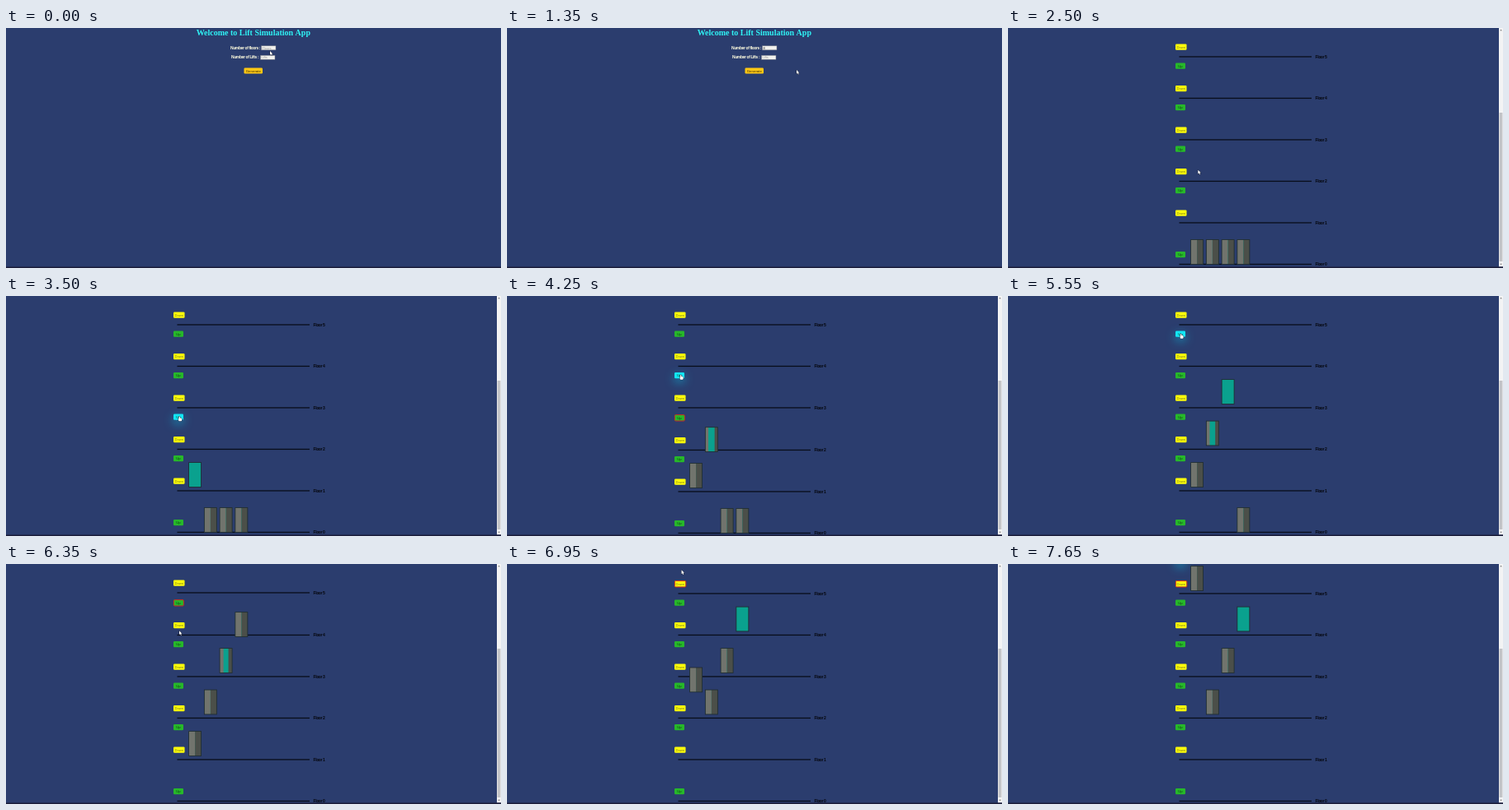
An HTML page with a canvas for the animation above (7.7 s loop, 600 by 292 pixels).

```html
<!DOCTYPE html>
<html lang="en">
<head>
<meta charset="utf-8">
<title>Lift Simulation</title>
<style>
html, body { margin: 0; width: 100%; height: 100%; overflow: hidden; background: #2b3d6e; }
canvas { display: block; width: 600px; height: 292px; }
</style>
</head>
<body>
<canvas id="stage" width="600" height="292"></canvas>
<script>
const ctx = document.getElementById('stage').getContext('2d');
const LOOP = 7700, SCROLL = 157, FLOORS = 8, GAP = 50.5, GROUND = 287.4;
const SANS = '"Liberation Sans", Arial, sans-serif';
const SERIF = '"Liberation Serif", "Times New Roman", serif';
const TYPED_FLOORS = 600, TYPED_LIFTS = 1700, GENERATED = 1900;

// time, x, y of the pointer tip
const path = [
  [50, 320, 28], [300, 317, 23], [750, 322, 27], [900, 322, 27], [1200, 374, 46],
  [1350, 351, 51], [1500, 351, 51], [1600, 318, 35], [1750, 318, 35], [1850, 302, 51],
  [2150, 302, 51], [2400, 236, 169], [2500, 230.5, 172.5], [2620, 210, 197],
  [2950, 210, 197], [3150, 210, 147], [3750, 210, 147], [3950, 210.5, 96.5],
  [4600, 210.5, 96.5], [4850, 209.5, 46.5], [5700, 209.5, 46.5], [6000, 211, 78],
  [6350, 210, 81.5], [6600, 210, 23], [6850, 210, 23], [7050, 213, -8]
];

// each trip: lift, floors, start, duration, door opening and closing end
const trips = [
  { lift: 0, from: 0, to: 1, at: 2640, dur: 300, open: 2850, shut: 4150, dir: 'Up' },
  { lift: 1, from: 0, to: 2, at: 3780, dur: 680, open: 4125, shut: 5662, dir: 'Up' },
  { lift: 2, from: 0, to: 3, at: 4310, dur: 720, open: 4950, shut: 6450, dir: 'Up' },
  { lift: 3, from: 0, to: 4, at: 5600, dur: 970, open: 6450, shut: 7950, dir: 'Up' },
  { lift: 0, from: 1, to: 5, at: 6700, dur: 1050, open: 7720, shut: 9000, dir: 'Down' }
];

const clamp = v => Math.max(0, Math.min(1, v));
const mix = (a, b, u) => a + (b - a) * u;
const lineY = n => GROUND - GAP * n;
const buttonY = (n, dir) => lineY(n) - (dir === 'Down' || n === 0 ? 11.8 : 39.3);
const liftY = n => 257.6 - GAP * n - (n ? 4.5 : 0);

// cubic-bezier(.25, .1, .25, 1)
function ease(x) {
  if (x <= 0 || x >= 1) return clamp(x);
  let lo = 0, hi = 1, s = 0.5;
  for (let i = 0; i < 24; i++) {
    s = (lo + hi) / 2;
    const r = 1 - s;
    if (0.75 * s * r * r + 0.75 * s * s * r + s ** 3 < x) lo = s; else hi = s;
  }
  const r = 1 - s;
  return 0.3 * s * r * r + 3 * s * s * r + s ** 3;
}

function pointerAt(t) {
  if (t <= path[0][0]) return path[0].slice(1);
  for (let i = 1; i < path.length; i++) {
    const a = path[i - 1], b = path[i];
    if (t <= b[0]) {
      const u = (t - a[0]) / (b[0] - a[0]);
      return [mix(a[1], b[1], u), mix(a[2], b[2], u)];
    }
  }
  return path[path.length - 1].slice(1);
}

function text(s, x, y, color, font, gap = 0, align = 'left') {
  ctx.font = font;
  ctx.letterSpacing = gap + 'px';
  ctx.textAlign = align;
  ctx.fillStyle = color;
  ctx.fillText(s, x, y);
}

function rect(x, y, w, h, color) {
  ctx.fillStyle = color;
  ctx.fillRect(x, y, w, h);
}

function box(x, y, w, h, r, fill, stroke) {
  ctx.beginPath();
  ctx.roundRect(x, y, w, h, r);
  ctx.fillStyle = fill;
  ctx.fill();
  if (stroke) {
    ctx.strokeStyle = stroke;
    ctx.lineWidth = 1;
    ctx.stroke();
  }
}

function drawInput(x, y, value, hint) {
  rect(x, y, 17.5, 5, '#f1f1ee');
  ctx.strokeStyle = '#777b86';
  ctx.lineWidth = 0.5;
  ctx.strokeRect(x, y, 17.5, 5);
  text(value || hint, x + 1, y + 4, value ? '#222' : '#999', '4px ' + SANS);
}

function drawForm(t) {
  const dx = t >= GENERATED ? -2.5 : 0;
  const label = 'bold 5px ' + SANS;
  ctx.save();
  ctx.translate(dx, 0);
  text('Welcome to Lift Simulation App', 299.8, 9, '#2ff3f5', 'bold 10px ' + SERIF, 0, 'center');
  text('Number of floors :', 272, 25.8, '#fffde0', label, -0.4);
  text('Number of Lifts :', 273, 37.3, '#fffde0', label, -0.4);
  drawInput(309.5, 21.8, t >= TYPED_FLOORS ? '8' : '', 'Floors');
  drawInput(308.5, 33.3, t >= TYPED_LIFTS ? '4' : '', 'Lifts');
  box(288.5, 48.5, 22.5, 7, 1.2, '#ffc814');
  text('Generate', 299.8, 53.5, '#3a2c00', '4.4px ' + SANS, 0, 'center');
  ctx.restore();
}

function drawButton(dir, y, hover, active) {
  const down = dir === 'Down', w = down ? 13.5 : 12;
  ctx.save();
  if (hover) {
    ctx.shadowColor = 'rgba(0,225,255,.6)';
    ctx.shadowBlur = 12;
    ctx.shadowOffsetY = 4;
  }
  box(203, y - 3.7, w, 7.4, 1.2, hover ? '#12e6f5' : down ? '#ffff0a' : '#27b82a');
  ctx.restore();
  if (active) {
    ctx.beginPath();
    ctx.roundRect(203.4, y - 3.5, w, 7.4, 1.2);
    ctx.strokeStyle = '#d8261c';
    ctx.lineWidth = 0.9;
    ctx.stroke();
  }
  text(dir, 203 + w / 2, y + 1.6, down ? '#77761a' : '#0b3a10', '4.2px ' + SANS, 0, 'center');
}

function drawLift(i, t, shift) {
  const x = 221.6 + 18.75 * i;
  let y = liftY(0), gap = 0;
  for (const p of trips) {
    if (p.lift !== i || t < p.at) continue;
    y = mix(liftY(p.from), liftY(p.to), ease((t - p.at) / p.dur));
    gap = clamp((t - p.open) / 250) * clamp((p.shut - t) / 250);
  }
  y += shift;
  const w = 15, h = 29.8, door = w / 2 * (1 - gap);
  rect(x, y, w, h, '#0aa18e');
  rect(x, y, door, h, '#71746d');
  rect(x + w - door, y, door, h, '#4b4f49');
  ctx.strokeStyle = '#20262c';
  ctx.lineWidth = 0.8;
  ctx.strokeRect(x, y, w, h);
}

function drawBuilding(t, px, py) {
  const active = trips.filter(p => t >= p.at && t < p.at + p.dur);
  const shiftAt = y => active.filter(p => buttonY(p.to, p.dir) <= y + 0.01).length;
  const button = (n, dir) => {
    const base = buttonY(n, dir), y = base + shiftAt(base);
    const hover = px > 203 && px < 216 && Math.abs(py - y) < 4;
    drawButton(dir, y, hover, active.some(p => p.to === n && p.dir === dir));
  };
  for (let n = FLOORS - 1; n >= 0; n--) {
    const base = lineY(n), y = base + shiftAt(base);
    rect(207.5, y - 0.6, 160.5, 1.3, '#080d1a');
    text('Floor ' + n, 372.5, y + 1.7, '#05070d', 'bold 5px ' + SANS, -0.4);
    if (n < FLOORS - 1) button(n, 'Up');
    if (n > 0) button(n, 'Down');
  }
  for (let i = 0; i < 4; i++) drawLift(i, t, shiftAt(GROUND));
}

function triangle(x, y, d) {
  ctx.fillStyle = '#666';
  ctx.beginPath();
  ctx.moveTo(x - 1.2, y + d);
  ctx.lineTo(x + 1.2, y + d);
  ctx.lineTo(x, y - d);
  ctx.fill();
}

function drawScrollbar(u) {
  rect(595, 0, 5, 290.5, '#f3f3f4');
  rect(595.6, mix(5, 103, u), 3.8, 181, '#c3c4c7');
  triangle(597.6, 2.5, 0.8);
  triangle(597.6, 287.5, -0.8);
}

function drawPointer(x, y, hand) {
  ctx.save();
  ctx.translate(x, y);
  ctx.beginPath();
  if (hand) {
    ctx.roundRect(-0.4, -0.6, 1.3, 4, 0.6);
    ctx.roundRect(-0.9, 1.6, 4, 3.6, 1);
  } else {
    ctx.moveTo(0, 0);
    ctx.lineTo(0, 4.8);
    ctx.lineTo(1.1, 3.8);
    ctx.lineTo(2, 5.6);
    ctx.lineTo(2.8, 5.2);
    ctx.lineTo(2, 3.5);
    ctx.lineTo(3.4, 3.4);
    ctx.closePath();
  }
  ctx.lineWidth = 0.8;
  ctx.strokeStyle = '#141a2c';
  ctx.stroke();
  ctx.fillStyle = '#fff';
  ctx.fill();
  ctx.restore();
}

function frame() {
  const t = performance.now() % LOOP;
  const u = clamp((t - 2150) / 300);
  const [px, py] = pointerAt(t);
  rect(0, 0, 600, 292, '#2b3d6e');
  ctx.save();
  ctx.translate(0, -SCROLL * u);
  drawForm(t);
  ctx.restore();
  if (t >= GENERATED) {
    const offset = SCROLL * (1 - u);
    ctx.save();
    ctx.translate(0, offset);
    drawBuilding(t, px, py - offset);
    ctx.restore();
    drawScrollbar(u);
  }
  rect(0, 290.5, 600, 1.5, '#1b1c38');
  const onButton = px < 216 && trips.some(p => Math.abs(buttonY(p.to, p.dir) - py) < 4);
  const onGenerate = px > 288 && px < 311 && py > 48 && py < 56;
  drawPointer(px, py, t > 1750 && (onButton || onGenerate && t < 2150));
  requestAnimationFrame(frame);
}
frame();
</script>
</body>
</html>
```
